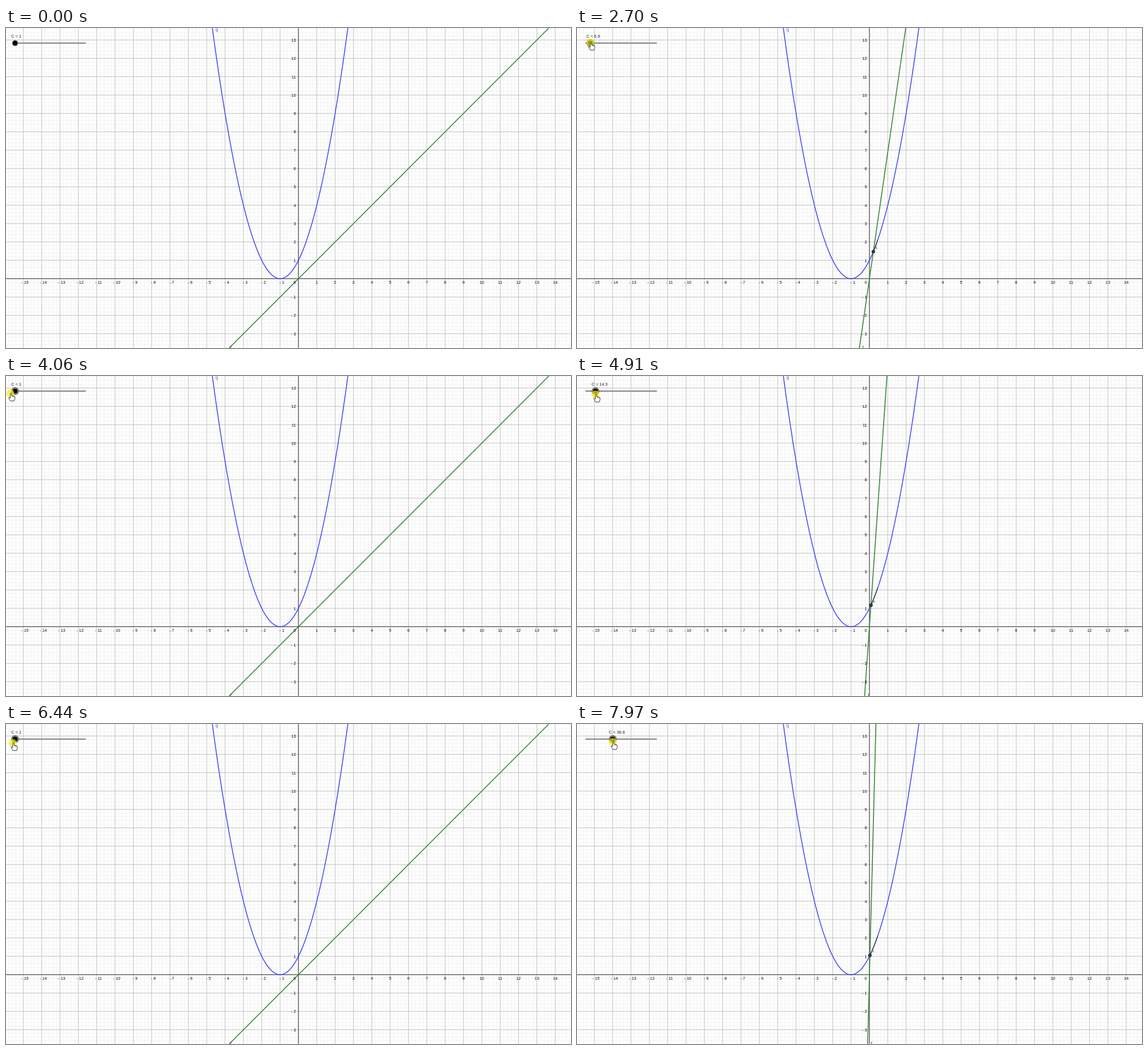
Recreate the animation shown at these times as an HTML page with a canvas. Size 995x563 px, loop 8000 ms.

```html
<!DOCTYPE html>
<html lang="en">
<head>
<meta charset="utf-8">
<title>Line and parabola</title>
<style>
html, body { margin: 0; width: 100%; height: 100%; overflow: hidden; background: #fff; }
canvas { display: block; }
</style>
</head>
<body>
<canvas id="stage" width="995" height="563"></canvas>
<script>
const W = 995, H = 563, LOOP = 8000;
const OX = 515, OY = 441, UNIT = 32.3;
const FONT = 'Arial, "Liberation Sans", sans-serif';
const BLUE = '#4343f5';
const ctx = document.getElementById('stage').getContext('2d');

// each drag pulls C steadily from 1 up to top and back
const DRAGS = [
  { start: 2190, peak: 3210, end: 3860, top: 12.8 },
  { start: 4400, peak: 5590, end: 6380, top: 32.1 },
  { start: 6780, peak: 7970, end: 8700, top: 38.6 }
];

const px = x => OX + x * UNIT;
const py = y => OY - y * UNIT;
const part = (t, a, b) => Math.max(0, Math.min(1, (t - a) / (b - a)));
const arch = p => Math.sin(Math.PI * p);
const handleX = c => 16 + (c - 1) * 1.25;
// nearer root of (x + 1)^2 = c x
const crossing = c => (c - 2 - Math.sqrt(c * c - 4 * c)) / 2;

function stepTime(t) {
  if (t < 2030) return Math.floor(t / 170) * 170;
  if (t < 2360) return 2030;
  return Math.floor((t + 20) / 170) * 170 - 20;
}

function sliderAt(t) {
  let c = 1;
  for (const d of DRAGS) {
    c += (d.top - 1) * (part(t, d.start, d.peak) - part(t, d.peak, d.end));
  }
  return Math.round(c * 10) / 10;
}

function pointerAt(t, c) {
  if (t < 2030) {
    const p = part(t, 170, 1360), far = (1 - p) ** 2, q = part(t, 1360, 1700);
    return {
      x: 11 + 535 * far + 5 * q,
      y: 29 + 36 * far - 20 * arch(p) - 4 * q + 4 * arch(q)
    };
  }
  // between drags the hand swings past the end of the track
  let x = handleX(c) + 1;
  for (let i = 1; i < DRAGS.length; i++) {
    x -= 9 * arch(part(t, DRAGS[i - 1].end, DRAGS[i].start));
  }
  return { x, y: Math.max(25, 33 - ((t - 6200) / 1250) ** 2) };
}

function segment(x1, y1, x2, y2, color, width) {
  ctx.beginPath();
  ctx.moveTo(x1, y1);
  ctx.lineTo(x2, y2);
  ctx.strokeStyle = color;
  ctx.lineWidth = width;
  ctx.stroke();
}

function disc(x, y, r, color) {
  ctx.beginPath();
  ctx.arc(x, y, r, 0, Math.PI * 2);
  ctx.fillStyle = color;
  ctx.fill();
}

function text(s, x, y, color, size, align = 'left') {
  ctx.font = size + 'px ' + FONT;
  ctx.textAlign = align;
  ctx.fillStyle = color;
  ctx.fillText(s, x, y);
}

function gridLines(step, color, width) {
  for (let k = -90; k <= 90; k++) {
    const x = px(k * step), y = py(k * step);
    if (x > 0 && x < W) segment(x, 0, x, H, color, width);
    if (y > 0 && y < H) segment(0, y, W, y, color, width);
  }
}

function drawPlane() {
  ctx.fillStyle = '#fff';
  ctx.fillRect(0, 0, W, H);
  gridLines(0.2, '#f1f1f1', 0.9);
  gridLines(1, '#bdbdbd', 0.9);
  segment(0, OY, W, OY, '#333', 1);
  segment(OX, 0, OX, H, '#333', 1);
}

function drawNumbers() {
  const name = n => n < 0 ? '- ' + -n : '' + n;
  for (let n = -15; n <= 14; n++) {
    if (n) text(name(n), px(n) + (n < 0 ? 3 : 0), OY + 8.8, '#111', 7.3, 'center');
  }
  for (let n = -3; n <= 13; n++) {
    if (n) text(name(n), 510.5, py(n) + 2.8, '#111', 7.3, 'right');
  }
  text('0', 510.5, OY + 8.8, '#111', 7.3, 'right');
}

function parabola(from, to, color) {
  ctx.beginPath();
  for (let i = 0; i <= 150; i++) {
    const x = from + (to - from) * i / 150;
    ctx.lineTo(px(x), py((x + 1) ** 2));
  }
  ctx.strokeStyle = color;
  ctx.lineWidth = 1.5;
  ctx.stroke();
}

function drawLine(c) {
  const low = (OY - H) / UNIT / c, high = OY / UNIT / c;
  segment(px(low), H, px(high), 0, '#378637', 1.6);
  text('f', px(low) + 2 + 4 * (1 - 1 / c), 564, '#333', 7.5);
}

function drawCrossing(c) {
  if (c < 4) return;
  const x = crossing(c), y = c * x;
  if (x < 0.45) parabola(x, 0.45, '#3c4454');
  text('A', px(x) + 2, py(y) - 4.5, '#555', 7.5);
  disc(px(x), py(y), 3, '#111');
  disc(px(x), py(y), 2.1, '#444');
}

function drawSlider(c, active) {
  const x = handleX(c), y = 26.6;
  ctx.lineCap = 'round';
  segment(16, y, 139.5, y, '#999', 2.8);
  ctx.lineCap = 'butt';
  disc(x, y, active ? 7 : 5.4, '#777');
  disc(x, y, 4, '#000');
  text('C = ' + c, x - 6.8, 17.3, '#222', 7.4);
}

function outlined(points) {
  ctx.beginPath();
  for (const [x, y] of points) ctx.lineTo(x, y);
  ctx.closePath();
  ctx.fillStyle = '#fff';
  ctx.strokeStyle = '#222';
  ctx.lineWidth = 0.9;
  ctx.lineJoin = 'round';
  ctx.fill();
  ctx.stroke();
}

function drawPointer({ x, y }, hand) {
  ctx.save();
  ctx.translate(x, y);
  if (hand) {
    outlined([[-1, 0.5], [0, 0], [1, 0.5], [1.2, 4.5], [5, 5.2], [6.8, 6.2],
      [7, 9.5], [5.6, 13.8], [-0.8, 13.8], [-3.8, 8.6], [-3.5, 7.2], [-1.1, 8.6]]);
    segment(3, 5, 3, 7, '#333', 0.7);
    segment(5, 5.5, 5, 7.5, '#333', 0.7);
  } else {
    outlined([[0, 0], [0, 13], [3, 10.3], [5, 15], [7, 14.2], [5, 9.6], [9, 9.3]]);
  }
  ctx.restore();
}

function draw(now) {
  const t = stepTime(now % LOOP);
  const c = sliderAt(t), tip = pointerAt(t, c);
  const pressed = t >= 2030;
  drawPlane();
  parabola(-4.8, 2.8, BLUE);
  text('g', 369, 5, BLUE, 7.5);
  drawLine(c);
  drawCrossing(c);
  drawNumbers();
  drawSlider(c, pressed);
  if (pressed) disc(tip.x - 1, tip.y + 0.6, 7, 'rgba(245,240,0,0.68)');
  if (t >= 170) drawPointer(tip, t >= 1190);
}

const start = performance.now();
function tick() {
  draw(performance.now() - start);
  requestAnimationFrame(tick);
}
tick();
</script>
</body>
</html>
```
